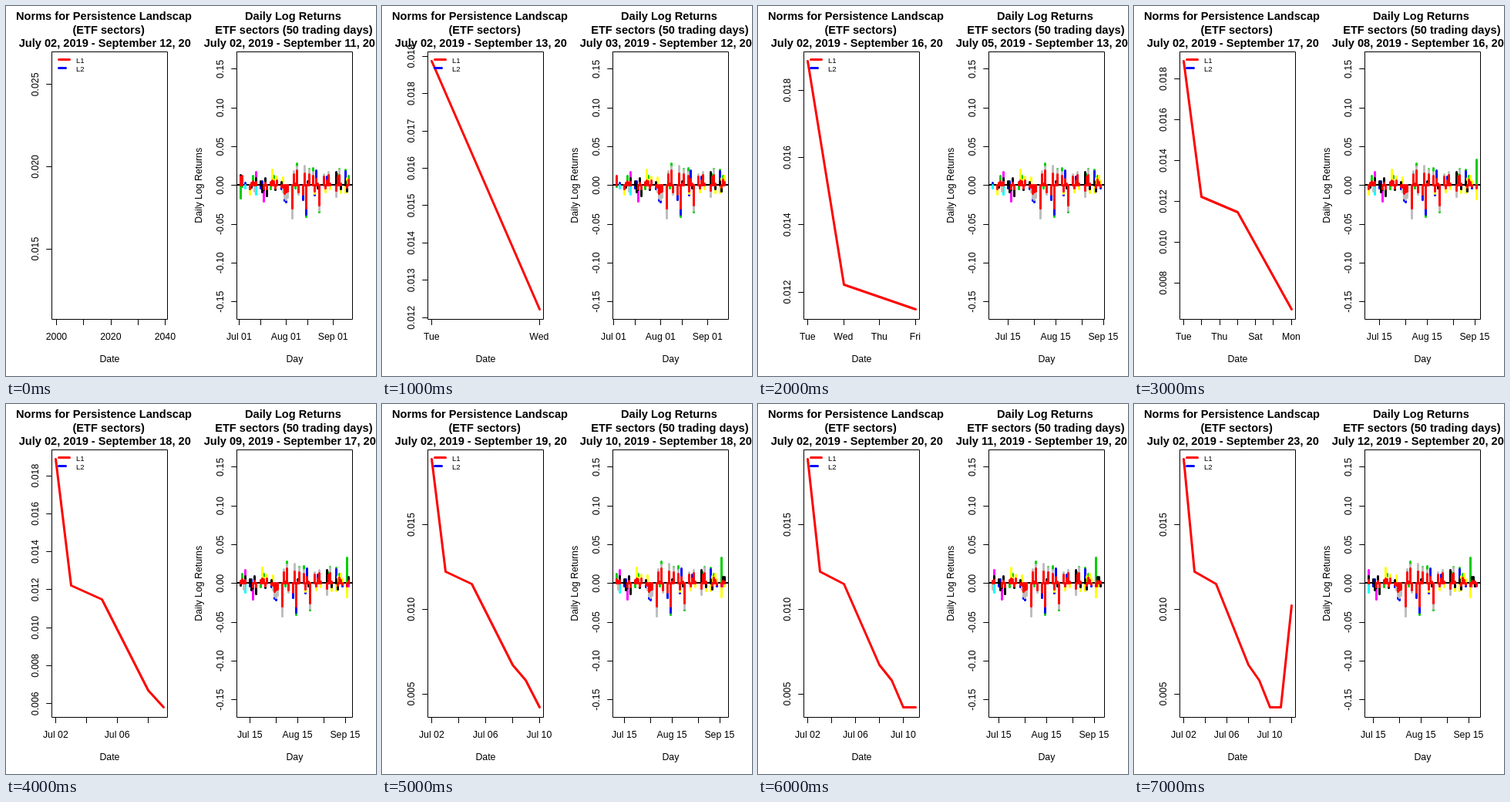
Animation of 480 by 480 pixels, one loop 8000 ms. Source, as an HTML page with a canvas:

```html
<!DOCTYPE html>
<html>
<head>
<meta charset="utf-8">
<style>
  html, body { margin: 0; overflow: hidden; background: #fff; }
  canvas { display: block; }
</style>
</head>
<body>
<canvas id="stage" width="480" height="480"></canvas>
<script>
const ctx = document.getElementById('stage').getContext('2d');
const FAMILY = 'Arial, "Liberation Sans", sans-serif';

// Plot boxes; data is inset by 4 % of the data range on each side
const TOP = 59.04, PLOT_H = 347.52, BOTTOM = TOP + PLOT_H;
const LEFT = 59.04, RIGHT = 299.04, PLOT_W = 150.72;
const PAD_X = PLOT_W / 27, PAD_Y = PLOT_H / 27;
const INNER_W = PLOT_W - 2 * PAD_X, INNER_H = PLOT_H - 2 * PAD_Y;
const ZERO = TOP + PLOT_H / 2;
const RETURN_SCALE = INNER_H / .32;
const STATES = 8, HOLD = 1000, WINDOW = 50;

const DAY = 864e5;
const dayNumber = (month, date) => Date.UTC(2019, month, date) / DAY;
const dateText = (day, options) =>
  new Date(day * DAY).toLocaleDateString('en-US', { timeZone: 'UTC', ...options });
const shortDate = day => dateText(day, { month: 'short', day: '2-digit' });
const longDate = day => dateText(day, { month: 'long', day: '2-digit' }) + ', 20';

// Trading days: weekdays without the two holidays
const holidays = [dayNumber(6, 4), dayNumber(8, 2)];
const days = [];
for (let d = dayNumber(6, 2); d <= dayNumber(8, 23); d++) {
  const weekday = new Date(d * DAY).getUTCDay();
  if (weekday % 6 && !holidays.includes(d)) days.push(d);
}

const norms = [.01886, .01222, .01148, .0067, .0058, .0042, .0042, .0102];

// Sector returns per trading day in thousandths; one row per week
const colors = { g: '#00cd00', b: '#00f', c: '#0ff', m: '#f0f', y: '#ff0', s: '#bebebe', k: '#000', r: '#f00' };
const returns = [
  'g-17 k13 r11, r12 g-2, b3 c-4',
  'y-12 r-5, r3 k-3, g12 r5, s-8 r3, m17 c-12 k9 r4',
  'k5 b-4, k-9 b5, m-21 k-6 r-5, k9 r3, k-14 r-5',
  'g-5 r4, y20 g8 r6, g12 y7 r5, k-6 r-4, y11 r6',
  'k4 b-5 r-2, y10 s-9 r-3, b-20 s-17 r-11, b-22 s-19 r-9, s-16 r-8',
  's-42 r-30, s18 r14, g-4 r2, g28 s24 r19, s-12 r-9',
  'b-19 r-12, s25 r15, g-40 b-37 r-30, k5 r2, g21 s20 r14',
  'g22 s17 r12, b-13 y-11 r-8, b19 r8, k-4 r2, g-35 s-33 r-26',
  's14 r11, y-9 r-4, b11 r6, s17 r13, y-5 r2',
  'k17 s-15 r-7, g14 r11, g21 s20 r13, y-10 k-5 r2',
  'g20 b18 y-10 k5, k-8 y9 r-3, g12 r7',
  'y12 r4, b-4 y5 r-2',
  'g33 y-18 r-4, m-4 k8 r3, k8 y-4 r2, k-4 r2, m-4 r-3'
].join().split(',').map(day =>
  day.trim().split(' ').map(bar => ({ color: bar[0], value: bar.slice(1) / 1000 })));

function text(str, x, y, { size = 12.3, align = 'center', bold = false, turn = false } = {}) {
  ctx.save();
  ctx.translate(x, y);
  if (turn) ctx.rotate(-Math.PI / 2);
  ctx.font = `${bold ? 'bold ' : ''}${size}px ${FAMILY}`;
  ctx.textAlign = align;
  ctx.fillStyle = '#000';
  ctx.fillText(str, 0, 0);
  ctx.restore();
}

// Points snap to pixel centres, as on a device without antialiasing
const snap = v => Math.floor(v) + .5;

function line(points, color = '#000', width = 1, cap = 'square') {
  ctx.beginPath();
  points.forEach(([x, y]) => ctx.lineTo(snap(x), snap(y)));
  ctx.strokeStyle = color;
  ctx.lineWidth = width;
  ctx.lineCap = cap;
  ctx.lineJoin = 'round';
  ctx.stroke();
}

const thick = (points, color) => line(points, color, 3, 'round');

function xTick(x, label) {
  line([[x, BOTTOM], [x, BOTTOM + 7]]);
  if (label) text(label, x - .3, 433);
}

function yTick(edge, y, label) {
  line([[edge - 7, y], [edge, y]]);
  text(label, edge - 17, y, { turn: true });
}

function frame(edge, label) {
  const end = edge + PLOT_W;
  line([[edge, TOP], [end, TOP], [end, BOTTOM], [edge, BOTTOM], [edge, TOP]]);
  text(label, edge + PLOT_W / 2, 462);
}

function title(lines) {
  lines.forEach(([str, x], i) =>
    text(str, x, [18, 36, 53][i], { size: 14.6, align: 'left', bold: true }));
}

function drawNorms(k) {
  const shown = norms.slice(0, k + 1);
  const hi = k ? norms[0] : norms[0] * 1.4;
  const lo = k ? Math.min(...shown) : norms[0] * .6;
  const span = days[k] - days[0];
  const xOf = day => LEFT + PAD_X + (day - days[0]) / span * INNER_W;
  const yOf = v => TOP + PAD_Y + (hi - v) / (hi - lo) * INNER_H;

  title([['Norms for Persistence Landscap', 13], ['(ETF sectors)', 86.5],
    [`${longDate(days[0])}19 - ${longDate(days[WINDOW + k])}`, 16.7]]);
  frame(LEFT, 'Date');

  const step = k === 0 || k > 4 ? 5 : k === 1 ? 1 : 2;
  for (let v = 0; v < 30; v += step) {
    const y = yOf(v / 1000);
    if (y > TOP && y < BOTTOM) yTick(LEFT, y, (v / 1000).toFixed(3));
  }

  if (k) {
    const stride = span > 6 ? 2 : 1, skip = span > 3 ? 2 : 1;
    for (let i = 0; i * stride <= span; i++) {
      const day = days[0] + i * stride;
      const label = span < 7 ? dateText(day, { weekday: 'short' }) : shortDate(day);
      xTick(xOf(day), i % skip ? '' : label);
    }
    thick(shown.map((v, i) => [xOf(days[i]), yOf(v)]), '#f00');
  } else {
    for (let i = 0; i < 5; i++) xTick(65.68 + i * 35.245, i % 2 ? '' : `${2000 + i * 10}`);
  }

  thick([[68, 69], [82, 69]], '#f00');
  thick([[68, 80], [77, 80]], '#00f');
  text('L1', 91, 74, { size: 9.6, align: 'left' });
  text('L2', 91, 85, { size: 9.6, align: 'left' });
}

function drawReturns(k) {
  const first = days[k], last = days[k + WINDOW - 1];
  const xOf = day => RIGHT + PAD_X + (day - first) / (last - first) * INNER_W;
  const yOf = v => ZERO - v * RETURN_SCALE;

  title([['Daily Log Returns', 310], ['ETF sectors (50 trading days)', 271.2],
    [`${longDate(first)}19 - ${longDate(last)}`, 256.7]]);
  frame(RIGHT, 'Day');
  text('Daily Log Returns', 253.5, ZERO, { turn: true });
  for (let i = -3; i <= 3; i++) yTick(RIGHT, yOf(i * .05), (i * .05).toFixed(2));

  const ticks = [6, 7, 8].flatMap(m => [dayNumber(m, 1), dayNumber(m, 15)])
    .filter(d => xOf(d) >= RIGHT && xOf(d) <= RIGHT + PLOT_W);
  ticks.forEach((d, i) => xTick(xOf(d), i % 2 ? '' : shortDate(d)));

  ctx.fillStyle = '#000';
  ctx.fillRect(Math.floor(RIGHT), Math.floor(ZERO) - 1, Math.floor(PLOT_W), 2);
  for (const color in colors) {
    for (let i = k; i < k + WINDOW; i++) {
      const x = xOf(days[i]);
      returns[i].filter(bar => bar.color === color).forEach(bar =>
        thick([[x, ZERO], [x, yOf(bar.value)]], colors[color]));
    }
  }
}

let current = -1;
function render(now) {
  const k = Math.floor(now / HOLD) % STATES;
  if (k !== current) {
    current = k;
    ctx.fillStyle = '#fff';
    ctx.fillRect(0, 0, 480, 480);
    drawNorms(k);
    drawReturns(k);
  }
  requestAnimationFrame(render);
}
render(performance.now());
</script>
</body>
</html>
```
